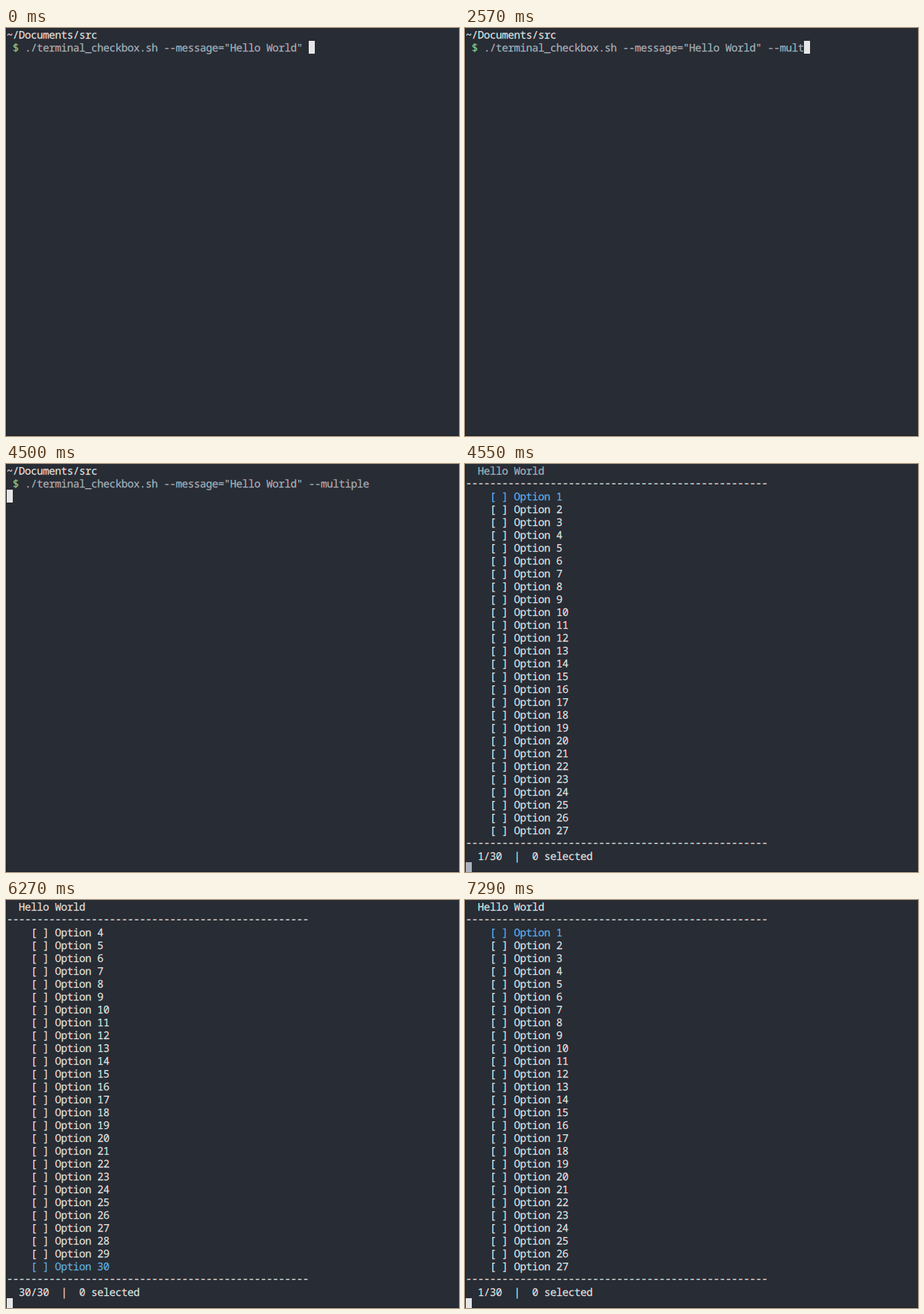
Animation, 600 px wide and 540 px high, one loop 8 s. Source, as an HTML page:

```html
<!DOCTYPE html>
<html lang="en">
<head>
<meta charset="utf-8">
<title>Terminal checkbox</title>
<style>
  html, body { margin: 0; width: 100%; height: 100%; overflow: hidden; background: #282c34; }
  svg { display: block; width: 600px; height: 540px; }
  text {
    font: 14px "Noto Sans Mono", "DejaVu Sans Mono", monospace;
    letter-spacing: -0.4px;
    white-space: pre;
    text-rendering: geometricPrecision;
    stroke: currentColor;
    stroke-width: 0.25px;
  }
  text, #caret rect { fill: currentColor; }
  use { mix-blend-mode: lighten; }
  filter { color-interpolation-filters: sRGB; }
  .white { color: #e6e6e6; }
  .gray { color: #abb2bf; }
  .prompt { color: #8fcf8a; }
  .blue { color: #61afef; }
  .edge { fill: #1e2127; }
</style>
</head>
<body>
<svg viewBox="0 0 600 540">
  <defs>
    <g id="letters"></g>
    <filter id="red"><feColorMatrix values="1 0 0 0 0  0 0 0 0 0  0 0 0 0 0  0 0 0 1 0"/></filter>
    <filter id="green"><feColorMatrix values="0 0 0 0 0  0 1 0 0 0  0 0 0 0 0  0 0 0 1 0"/></filter>
    <filter id="blue"><feColorMatrix values="0 0 0 0 0  0 0 0 0 0  0 0 1 0 0  0 0 0 1 0"/></filter>
  </defs>
  <rect width="600" height="540" fill="#282c34"/>
  <rect class="edge" width="1" height="540"/>
  <rect class="edge" y="539" width="600" height="1"/>
  <!-- Subpixel text: each colour channel sits a third of a pixel apart -->
  <use href="#letters" x="0.33" filter="url(#red)"/>
  <use href="#letters" filter="url(#green)"/>
  <use href="#letters" x="-0.33" filter="url(#blue)"/>
  <g id="caret"></g>
</svg>
<script>
const LOOP = 8000, CELL_W = 8, CELL_H = 17;
const TOTAL = 30, PAGE = 27;
const ENTER = 4500, LIST = 4550;
const COMMAND = './terminal_checkbox.sh --message="Hello World" ';

// Each entry: [time, typed argument]
const typing = [
  [0, ""], [1210, "-"], [1350, "--"], [1750, "--m"], [2130, "--mu"],
  [2330, "--mul"], [2570, "--mult"], [2670, "--multi"], [2930, "--multil"],
  [3360, "--multi"], [3700, "--multip"], [3880, "--multipl"], [3990, "--multiple"]
];
const ERASED = 9;

// Each entry: [time, active option, first visible option]
const moves = [
  [LIST, 1, 1], [5580, 6, 1], [5740, 11, 1], [5850, 16, 1], [6000, 21, 1],
  [6120, 26, 1], [6270, 30, 4], [6620, 25, 4], [6740, 20, 4], [6870, 15, 4],
  [6990, 10, 4], [7150, 5, 4], [7290, 1, 1]
];

const letters = document.getElementById("letters");
const caret = document.getElementById("caret");
const lastStep = (steps, time) => steps.findLastIndex(([start]) => start <= time);

const put = (col, row, text, color, lift = 0) =>
  `<text x="${0.8 + col * CELL_W}" y="${row * CELL_H + 14 - lift}" class="${color}">${text}</text>`;

const cursor = (col, row, color = "white") =>
  `<rect x="${1 + col * CELL_W}" y="${row * CELL_H}" width="${CELL_W}" height="${CELL_H}" class="${color}"/>`;

const rule = row => put(0, row, "-".repeat(50), "white", 1);

function shell(time) {
  const step = lastStep(typing, time);
  const line = COMMAND + typing[step][1];
  return {
    text: put(0, 0, "~/Documents/src", "white") + put(1, 1, "$", "prompt") +
      put(3, 1, line.trimEnd(), "gray"),
    block: time >= ENTER
      ? cursor(0, 2)
      : cursor(3 + line.length, 1, step === ERASED ? "gray" : "white")
  };
}

function list(time) {
  const step = lastStep(moves, time);
  const [, active, first] = moves[step];
  // The first paint still carries the prompt's colour
  const leak = step === 0 ? "gray" : "white";
  let text = put(2, 0, "Hello World", leak) + rule(1);
  for (let i = 0; i < PAGE; i++) {
    const number = first + i;
    text += put(4, 2 + i, `[ ] Option ${number}`, number === active ? "blue" : "white");
  }
  text += rule(PAGE + 2) + put(2, PAGE + 3, `${active}/${TOTAL}  |  0 selected`, "white");
  return { text, block: cursor(0, PAGE + 4, leak) };
}

let shown = "";
function draw() {
  const time = performance.now() % LOOP;
  const { text, block } = time < LIST ? shell(time) : list(time);
  if (text + block !== shown) {
    letters.innerHTML = text;
    caret.innerHTML = block;
    shown = text + block;
  }
  requestAnimationFrame(draw);
}
draw();
</script>
</body>
</html>
```
